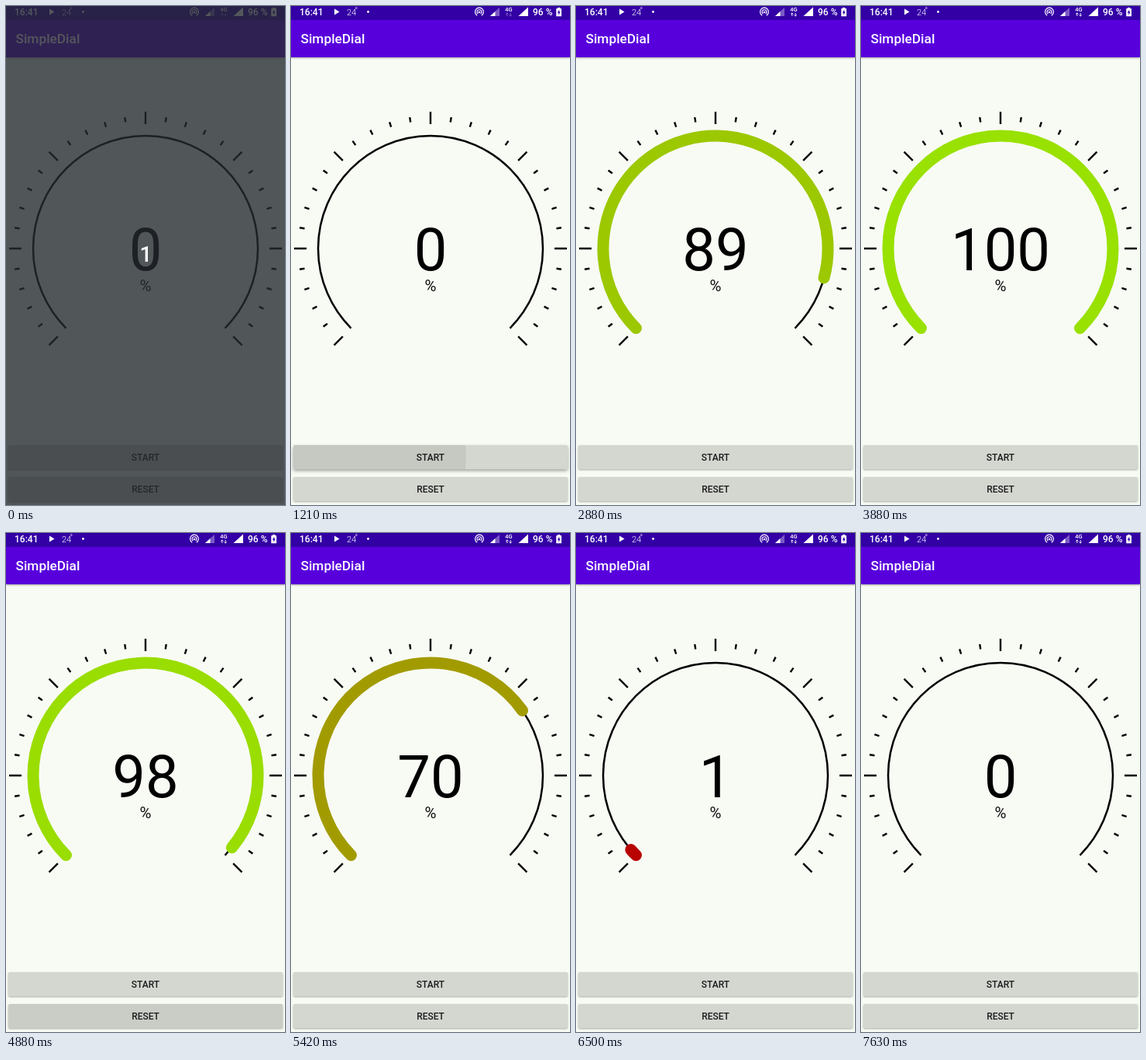
These frames come from a looping animation (360 px wide and 642 px high, 7710 ms). An HTML page:

```html
<!DOCTYPE html>
<html lang="en">
<head>
<meta charset="utf-8">
<title>Gauge</title>
<style>
  html, body { margin: 0; width: 100%; height: 100%; overflow: hidden; background: #f8faf4; }
  svg { display: block; width: 360px; height: 642px; font-family: Roboto, "Noto Sans", sans-serif; }
  .mid { text-anchor: middle; }
  .medium { font-weight: 500; }
  .button { fill: #d4d6d0; filter: drop-shadow(0 1.2px 1px rgba(0, 0, 0, .32)); }
  .button.pressed { filter: drop-shadow(0 2px 2px rgba(0, 0, 0, .36)); }
  .bar { filter: drop-shadow(0 1px 1.2px rgba(0, 0, 0, .35)); }
</style>
</head>
<body>
<svg viewBox="0 0 360 642">
  <defs>
    <clipPath id="startClip"><rect x="3" y="565" width="354" height="31" rx="2"/></clipPath>
    <clipPath id="resetClip"><rect x="3" y="606" width="354" height="31" rx="2"/></clipPath>
  </defs>
  <rect width="360" height="642" fill="#f8faf4"/>

  <rect class="bar" width="360" height="66" fill="#5800dc"/>
  <rect width="360" height="18" fill="#3300a6"/>
  <text class="medium" x="12.5" y="48" font-size="17.3" fill="#fff">SimpleDial</text>

  <g fill="#fff">
    <text class="medium" x="11" y="12.3" font-size="12">16:41</text>
    <path d="M56 3.5L62.5 7.5L56 11.5Z"/>
    <text x="72" y="12" font-size="11" font-weight="300">24</text>
    <circle cx="84.3" cy="2.6" r="1" fill="none" stroke="#fff" stroke-width=".6"/>
    <circle cx="99.5" cy="7.5" r="1.4"/>
    <g fill="none" stroke="#fff" stroke-width="1.2">
      <path d="M240.2 12.2A5.4 5.4 0 1 1 245.8 12.2"/>
      <path d="M241.3 10A2.9 2.9 0 1 1 244.7 10"/>
    </g>
    <circle cx="243" cy="8" r="1.3"/>
    <path d="M269 2V13H257Z" opacity=".35"/>
    <path d="M263.5 7V13H257Z"/>
    <text class="mid medium" x="281" y="7" font-size="7.5">4G</text>
    <g id="dataArrows" fill="none" stroke="#fff" stroke-width=".9">
      <path d="M278.8 13V9M277.2 10.5L278.8 9L280.4 10.5"/>
      <path d="M283.2 9V13M281.6 11.5L283.2 13L284.8 11.5"/>
    </g>
    <path d="M306 1.5V13H293.5Z"/>
    <text class="medium" x="312" y="12.3" font-size="12">96 %</text>
    <path d="M344 2H347.2V3.2H349V13.2H342.2V3.2H344Z"/>
    <path d="M346.2 4.7L343.7 8.8H345.3V11.8L347.7 7.6H346.2Z" fill="#3300a6"/>
  </g>

  <path id="ticks" stroke="#000" stroke-width="2.4"/>
  <path id="track" fill="none" stroke="#000" stroke-width="2.5"/>
  <path id="progress" fill="none" stroke-width="15" stroke-linecap="round"/>
  <text id="number" class="mid" x="180" y="339.5" font-size="76"></text>
  <text class="mid" x="180" y="366.5" font-size="20.5" fill="#111">%</text>

  <rect id="start" class="button" x="3" y="565" width="354" height="31" rx="2"/>
  <circle id="startRipple" cx="100" cy="580" clip-path="url(#startClip)"/>
  <text class="mid medium" x="180" y="584.8" font-size="12" fill="#1c1c1c">START</text>
  <rect id="reset" class="button" x="3" y="606" width="354" height="31" rx="2"/>
  <circle id="resetRipple" cx="100" cy="621" clip-path="url(#resetClip)"/>
  <text class="mid medium" x="180" y="625.8" font-size="12" fill="#1c1c1c">RESET</text>

  <g id="countdown">
    <rect width="360" height="642" fill="rgb(38,43,48)" fill-opacity=".79"/>
    <text class="mid medium" x="180.5" y="329" font-size="28" fill="#fff">1</text>
  </g>
</svg>
<script>
const LOOP = 7710, FRAME = 1000 / 24;
const CX = 180, CY = 312, RADIUS = 145, FIRST = 135, SWEEP = 270;
const RISE = { start: 1335, length: 1964 };
const FALL = { start: 4703, length: 1945 };
const GREEN = [[0, 0], [.28, 48], [.35, 69], [.89, 200], [1, 225]];

const el = id => document.getElementById(id);
const clamp = x => Math.min(1, Math.max(0, x));
const ease = x => .5 - Math.cos(Math.PI * clamp(x)) / 2;
const phase = (t, span) => ease((t - span.start) / span.length);

function point(radius, degrees) {
  const a = degrees * Math.PI / 180;
  return `${(CX + radius * Math.cos(a)).toFixed(2)} ${(CY + radius * Math.sin(a)).toFixed(2)}`;
}

function arc(sweep) {
  return `M${point(RADIUS, FIRST)}A${RADIUS} ${RADIUS} 0 ${+(sweep > 180)} 1 ${point(RADIUS, FIRST + sweep)}`;
}

function tickPath() {
  let d = "";
  for (let i = 0; i <= 30; i++) {
    const [inner, outer] = i % 5 ? [164.5, 171] : [160, 176];
    d += `M${point(inner, FIRST + i * 9)}L${point(outer, FIRST + i * 9)}`;
  }
  return d;
}

function gaugeColor(v) {
  const i = Math.max(1, GREEN.findIndex(stop => v <= stop[0]));
  const [[x0, g0], [x1, g1]] = [GREEN[i - 1], GREEN[i]];
  const green = g0 + (g1 - g0) * (v - x0) / (x1 - x0);
  return `rgb(${Math.round(184 - 31 * v)},${Math.round(green)},0)`;
}

function press(name, t, down, release) {
  const age = t - down;
  const fade = 1 - clamp((t - release - 80) / 290);
  const ripple = el(name + "Ripple");
  ripple.setAttribute("r", Math.min(300, Math.max(0, age * 3.2)));
  ripple.setAttribute("opacity", age > 0 ? .068 * fade : 0);
  el(name).classList.toggle("pressed", age > 0 && t < release + 120);
}

function render(time) {
  const t = Math.floor((time + 5) / FRAME) * FRAME;
  const value = t < FALL.start ? phase(t, RISE) : 1 - phase(t, FALL);
  const progress = el("progress");
  progress.setAttribute("d", value > .0005 ? arc(SWEEP * value) : "");
  progress.setAttribute("stroke", gaugeColor(value));
  el("number").textContent = Math.round(value * 100);
  el("dataArrows").setAttribute("opacity", t < 2400 ? .4 : 1);
  press("start", t, 1169, RISE.start);
  press("reset", t, 4540, FALL.start);
  el("countdown").setAttribute("display", t < 40 ? "inline" : "none");
}

el("ticks").setAttribute("d", tickPath());
el("track").setAttribute("d", arc(SWEEP));

const origin = performance.now();
function loop() {
  render((performance.now() - origin) % LOOP);
  requestAnimationFrame(loop);
}
loop();
</script>
</body>
</html>
```
